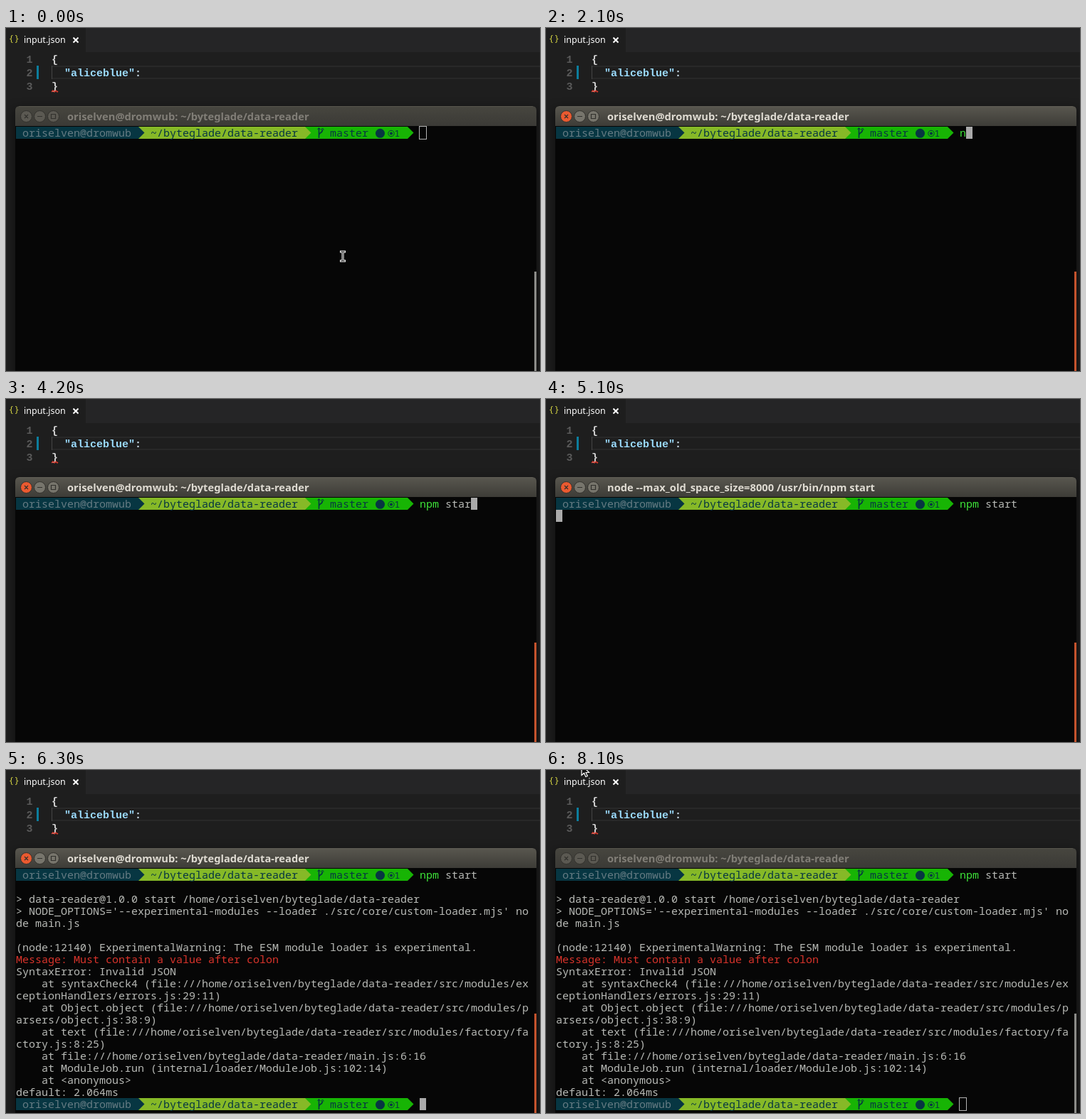
These frames come from a looping animation (750 px wide and 483 px high, 8200 ms). An HTML page:

```html
<!DOCTYPE html>
<html lang="en">
<head>
<meta charset="utf-8">
<title>Terminal session</title>
<style>
  html, body { margin: 0; width: 100%; height: 100%; overflow: hidden; background: #1e1e1e; }
  svg { display: block; width: 750px; height: 483px; }
  text { white-space: pre; }
  .term { font: 15px "Noto Sans Mono", monospace; fill: #b8bab6; }
  .code { font: bold 15px "Liberation Mono", monospace; fill: #d4d4d4; }
  .num { fill: #5a5a5a; }
  .title { font: bold 14.7px "Noto Sans", sans-serif; }
  .tab { font: 12.5px "Noto Sans", sans-serif; fill: #fff; }
  .icon { font: 13px "Noto Sans Mono", monospace; fill: #cbcb41; }
</style>
</head>
<body>
<svg viewBox="0 0 750 483" xmlns="http://www.w3.org/2000/svg">
  <defs>
    <linearGradient id="bar" x2="0" y2="1">
      <stop offset="0" stop-color="#59574f"/>
      <stop offset="1" stop-color="#3d3c37"/>
    </linearGradient>
    <linearGradient id="barDim" x2="0" y2="1">
      <stop offset="0" stop-color="#47463f"/>
      <stop offset="1" stop-color="#3b3a36"/>
    </linearGradient>
    <filter id="soft" x="-5%" y="-8%" width="110%" height="116%">
      <feGaussianBlur stdDeviation="8"/>
    </filter>
    <g id="prompt">
      <path d="M419 0H564L572.5 8.5L564 17H419Z" fill="#17b404"/>
      <path d="M185 0H420L428.5 8.5L420 17H185Z" fill="#86b927"/>
      <path d="M14 0H186L194.5 8.5L186 17H14Z" fill="#073642"/>
      <text class="term" id="who" x="23" y="14" style="fill:#657b83"></text>
      <text class="term" id="where" x="203" y="14" style="fill:#073642"></text>
      <g fill="none" stroke="#073642" stroke-width="1.6">
        <path d="M439.5 2V16M439.5 12.5Q439.5 9.5 442 8.5Q444.5 7.5 444.5 4"/>
        <path d="M437.5 4L439.5 1.5L441.5 4M442.5 4.5L444.5 2L446.5 4.5" stroke-width="1"/>
        <circle cx="541" cy="9.5" r="4.2" stroke-width="1"/>
      </g>
      <text class="term" x="455" y="14" style="fill:#073642">master</text>
      <circle cx="525.5" cy="9.3" r="6.5" fill="#073642"/>
      <circle cx="541" cy="9.5" r="2" fill="#073642"/>
      <text class="term" x="545.5" y="14" style="fill:#073642;font-size:13px">1</text>
    </g>
  </defs>

  <!-- editor -->
  <rect width="750" height="483" fill="#1e1e1e"/>
  <rect x="112" width="638" height="34" fill="#252526"/>
  <text class="icon" x="3.5" y="19">{}</text>
  <text class="tab" x="25" y="21">input.json</text>
  <path d="M94.5 13.5L101.5 20.5M101.5 13.5L94.5 20.5" stroke="#fff" stroke-width="2"/>
  <path d="M64 54H750M64 71H750" stroke="#282828" stroke-width="2"/>
  <path d="M64.5 53V72" stroke="#454545"/>
  <rect x="43" y="53" width="3" height="19" fill="#0c7d9d"/>
  <text class="code num" x="28.5" y="49">1</text>
  <text class="code num" x="28.5" y="68">2</text>
  <text class="code num" x="28.5" y="87">3</text>
  <text class="code" x="64" y="49">{</text>
  <text class="code" x="82" y="68" style="fill:#9cdcfe">"aliceblue"<tspan fill="#c8dcea">:</tspan></text>
  <text class="code" x="64" y="87">}</text>
  <path d="M64 90L66 88L68 90L70 88L72 90L73 89" fill="none" stroke="#e0392b" stroke-width="1.3"/>

  <!-- terminal window -->
  <rect x="11" y="114" width="736" height="400" fill="#000" opacity=".45" filter="url(#soft)"/>
  <path id="head" d="M13 138V116Q13 110 19 110H739Q745 110 745 116V138Z"/>
  <path d="M18 110.5H740" stroke="#6a685f" stroke-opacity=".5"/>
  <rect x="13" y="138" width="732" height="345" fill="#060606"/>
  <g id="buttons" stroke="#32312d">
    <circle id="close" cx="28.5" cy="124.5" r="8"/>
    <circle cx="47.5" cy="124.5" r="8"/>
    <circle cx="66.5" cy="124.5" r="8"/>
    <path d="M26 122L31 127M31 122L26 127M44 124.5H51M63.5 121.5H69.5V127.5H63.5Z" fill="none" stroke-width="1.2"/>
  </g>
  <text id="title" class="title" x="86" y="130"></text>
  <rect id="scroll" x="742" y="343" width="3" height="140"/>
  <use href="#prompt" y="139"/>
  <use id="prompt2" href="#prompt" y="462"/>
  <text class="term" x="581" y="153"><tspan id="cmd"></tspan><tspan id="arg"></tspan></text>
  <g id="output"></g>
  <rect id="cursor"/>

  <!-- pointer -->
  <g id="beam" fill="none" stroke-linecap="square">
    <path d="M-2.5 -6.5H2.5M-2.5 6.5H2.5M0 -6V6" stroke="#fff" stroke-width="3"/>
    <path d="M-2.5 -6.5H2.5M-2.5 6.5H2.5M0 -6V6" stroke="#111" stroke-width="1"/>
  </g>
  <path id="arrow" d="M0 0V14.5L3.5 11.3L5.8 16.5L8.3 15.4L6 10.5H10.5Z" fill="#111" stroke="#fff" stroke-width="1.2"/>
</svg>
<script>
const LOOP = 8200, CELL = 9, ROW = 17, LEFT = 14, TOP = 139, COLS = 80, PROMPT_COL = 63;
const user = 'oriselven', host = 'dromwub', app = 'data-reader';
const dir = 'byteglade/' + app, home = `/home/${user}/${dir}`;
const shellTitle = `${user}@${host}: ~/${dir}`;
const nodeTitle = 'node --max_old_space_size=8000 /usr/bin/npm start';
const command = 'npm start';
const keyTimes = [2100, 2700, 3000, 3200, 3800, 3900, 4100, 4200, 4400];
const blinkOff = [[1100, 1700], [4900, 5100], [5700, 6300], [6900, 7500]];
const log = [
  '',
  `> ${app}@1.0.0 start ${home}`,
  "> NODE_OPTIONS='--experimental-modules --loader ./src/core/custom-loader.mjs' node main.js",
  '',
  '(node:12140) ExperimentalWarning: The ESM module loader is experimental.',
  'Message: Must contain a value after colon',
  'SyntaxError: Invalid JSON',
  `    at syntaxCheck4 (file://${home}/src/modules/exceptionHandlers/errors.js:29:11)`,
  `    at Object.object (file://${home}/src/modules/parsers/object.js:38:9)`,
  `    at text (file://${home}/src/modules/factory/factory.js:8:25)`,
  `    at file://${home}/main.js:6:16`,
  '    at ModuleJob.run (internal/loader/ModuleJob.js:102:14)',
  '    at <anonymous>',
  'default: 2.064ms'
];

const $ = id => document.getElementById(id);
const set = (id, attrs) => { for (const k in attrs) $(id).setAttribute(k, attrs[k]); };
const show = (id, on) => set(id, { visibility: on ? 'visible' : 'hidden' });
const mix = (a, b, p) => a + (b - a) * p;
const clamp = p => Math.max(0, Math.min(1, p));
const smooth = p => p * p * (3 - 2 * p);

$('who').textContent = `${user}@${host}`;
$('where').textContent = `~/${dir}`;

// Wrap the log at the terminal width, one text element per row.
const rows = log.flatMap(s => s.match(new RegExp(`.{1,${COLS}}`, 'g')) || ['']).map((s, i) => {
  const el = document.createElementNS('http://www.w3.org/2000/svg', 'text');
  el.setAttribute('class', 'term');
  el.setAttribute('x', LEFT);
  el.setAttribute('y', TOP + 14 + (i + 1) * ROW);
  if (s.startsWith('Message')) el.style.fill = '#d9342b';
  el.textContent = s;
  return $('output').appendChild(el);
});

function drawWindow(t, focused) {
  set('head', { fill: focused ? 'url(#bar)' : 'url(#barDim)' });
  set('buttons', { fill: focused ? '#77756c' : '#5b5952' });
  set('close', { fill: focused ? '#ea5a30' : '#5b5952' });
  set('title', { fill: focused ? '#dfdbd2' : '#817e77' });
  set('scroll', { fill: focused ? '#c4532d' : '#8b8b88' });
  $('title').textContent = t >= 5100 && t < 5500 ? nodeTitle : shellTitle;
}

function drawShell(t, focused) {
  const typed = keyTimes.filter(k => k <= t).length;
  const text = command.slice(0, typed);
  $('cmd').textContent = text.slice(0, 3);
  $('arg').textContent = text.slice(3);
  set('cmd', { fill: typed === 2 && t >= 2800 ? '#ef2929' : '#3fe63a' });

  const shown = t < 5400 ? 0 : t < 5500 ? 5 : rows.length;
  rows.forEach((el, i) => el.setAttribute('visibility', i < shown ? 'visible' : 'hidden'));
  show('prompt2', t >= 5600);

  const row = t < 5100 ? 0 : shown + 1;
  const col = t < 5100 ? PROMPT_COL + typed : t < 5600 ? 0 : PROMPT_COL;
  const x = LEFT + col * CELL, y = TOP + row * ROW;
  show('cursor', !focused || !blinkOff.some(([a, b]) => t >= a && t < b));
  set('cursor', focused
    ? { x, y, width: CELL, height: ROW, fill: '#aaaaaa', stroke: 'none' }
    : { x: x - .5, y: y - .5, width: CELL + 1, height: ROW + 1, fill: 'none', stroke: '#b4b4b4' });
}

function drawPointer(t) {
  const step = Math.floor(t / 100) * 100;
  const p = t < 2100 ? 0 : smooth(clamp((step - 6400) / 900));
  const q = t < 2100 ? 0 : clamp((step - 7300) / 800);
  const x = mix(473, 45, p) + 5 * q, y = mix(321.5, 1, p) - 8 * q;
  const visible = t < 2100 || t >= 6500;
  const overText = y > 138 || (y > 34 && y < 110);
  show('beam', visible && overText);
  show('arrow', visible && !overText);
  const transform = `translate(${x} ${y})`;
  set('beam', { transform });
  set('arrow', { transform });
}

function draw(t) {
  const focused = t >= 500 && t < 8000;
  drawWindow(t, focused);
  drawShell(t, focused);
  drawPointer(t);
}

const start = performance.now();
function tick() {
  draw((performance.now() - start) % LOOP);
  requestAnimationFrame(tick);
}
draw(0);
requestAnimationFrame(tick);
</script>
</body>
</html>
```
